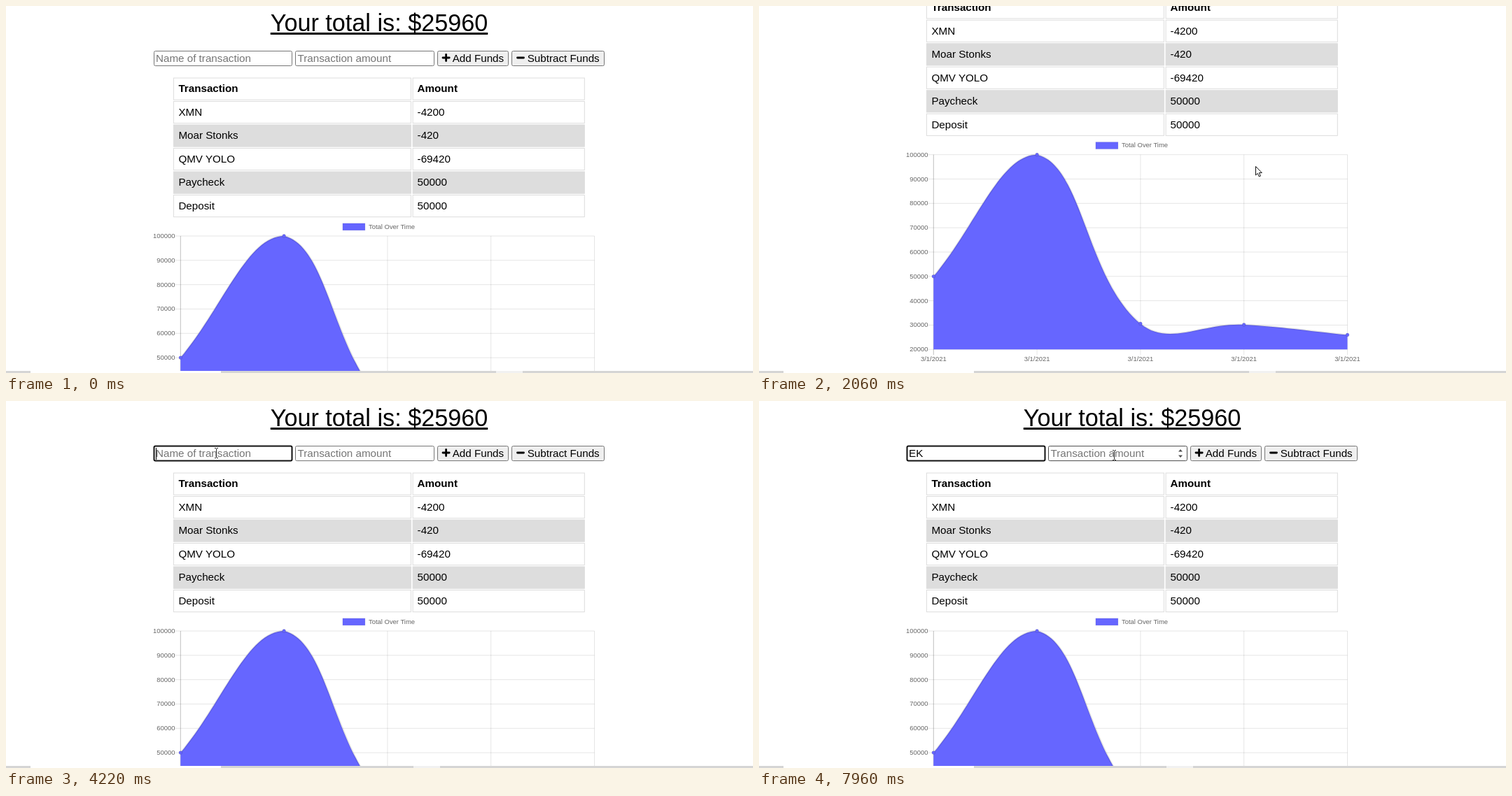
Recreate the animation shown at these times as an HTML page. Size 1067x525 px, loop 8000 ms.

```html
<!DOCTYPE html>
<html lang="en">
<head>
<meta charset="utf-8">
<title>Budget tracker</title>
<style>
html, body { margin: 0; width: 100%; height: 100%; overflow: hidden; background: #fff; }
#stage { position: relative; width: 1067px; height: 525px; overflow: hidden; font-family: "Liberation Sans", Arial, sans-serif; }
#view { position: absolute; inset: 0 0 3px; overflow: hidden; }
#page { position: absolute; left: 0; top: 0; width: 1067px; height: 650px; }
h1 { position: absolute; left: 0; top: 5px; width: 1066px; margin: 0; text-align: center; font: 34.2px/38px "Liberation Sans", Arial, sans-serif; text-decoration: underline; color: #000; }
svg { position: absolute; left: 0; top: 0; }
#page text { font-size: 15.2px; white-space: pre; }
#page .small { font-size: 9.45px; fill: #666; }
.hint { fill: #757575; }
.field { fill: #fff; stroke: #767676; }
.field.hover { stroke: #4f4f4f; }
.field.focus { stroke: #101010; stroke-width: 2; }
.button { fill: #efefef; stroke: #767676; }
#bar { position: absolute; left: 0; top: 522px; width: 1067px; height: 3px; background: #d5d5d5; }
#bar i { position: absolute; top: 0; height: 3px; }
</style>
</head>
<body>
<div id="stage">
  <div id="view">
    <div id="page">
      <h1>Your total is: $25960</h1>
      <svg id="art" width="1067" height="650"></svg>
    </div>
  </div>
  <div id="bar">
    <i style="left:35px;width:272px;background:#fff"></i>
    <i id="active" style="width:38px;background:#f1f1f1"></i>
  </div>
  <svg width="1067" height="522">
    <path id="arrow" d="M.5 .5V13L3.3 10.4 5.3 15 7.4 14.1 5.4 9.6H9.3Z" fill="#fff" stroke="#111" stroke-width="1"/>
    <path id="beam" d="M-2.5 -7.5H-.5M.5 -7.5H2.5M0 -7V6M-2.5 6.5H-.5M.5 6.5H2.5" fill="none" stroke="#333"/>
  </svg>
</div>
<script>
const LOOP = 8000, MAX_SCROLL = 116.3;
const $ = id => document.getElementById(id);

function add(tag, attrs, text) {
  const el = document.createElementNS('http://www.w3.org/2000/svg', tag);
  for (const k in attrs) el.setAttribute(k, attrs[k]);
  if (text) el.textContent = text;
  return $('art').appendChild(el);
}
const rect = (x, y, width, height, attrs) => add('rect', { x, y, width, height, ...attrs });
const label = (x, y, text, attrs) => add('text', { x, y, ...attrs }, text);

// form
const box = (x, w, cls) => rect(x, 64.5, w, 21, { rx: 2, class: cls });
const nameBox = box(211.5, 197, 'field');
const amountBox = box(413.5, 198, 'field');
const nameText = label(214, 80, 'Name of transaction');
label(416.5, 80, 'Transaction amount', { class: 'hint' });
const spinner = add('path', { d: 'M599 72.5L602 69 605 72.5ZM599 77.5L602 81 605 77.5Z', fill: '#505050' });
const caret = rect(214, 67, 1, 17, { fill: '#000' });
box(616.5, 101, 'button');
box(722.5, 132, 'button');
label(637.7, 80, 'Add Funds');
label(744.7, 80, 'Subtract Funds');
add('path', { d: 'M624 74H633.2M628.6 69.4V78.6M730.5 74H739.5', stroke: '#000', 'stroke-width': 2.8, 'stroke-linecap': 'round' });

// table
const rows = [['Transaction', 'Amount'], ['XMN', '-4200'], ['Moar Stonks', '-420'],
  ['QMV YOLO', '-69420'], ['Paycheck', '50000'], ['Deposit', '50000']];
rows.forEach((row, i) => {
  const y = 103 + 33.5 * i;
  const fill = i && i % 2 === 0 ? '#ddd' : '#fff';
  [[239.4, 339, 246.4], [581.1, 245.2, 587.6]].forEach(([x, w, tx], c) => {
    rect(x, y, w, 31.2, { fill, stroke: '#ddd' });
    label(tx, y + 20.4, row[c], { 'font-weight': i ? 400 : 700 });
  });
});

// chart
const left = 249.3, top0 = 329, stepX = 147.8, stepY = 34.82, bottom = top0 + 8 * stepY;
rect(480.9, 310.9, 32, 10, { fill: '#66f', stroke: '#0001' });
label(518, 318.8, 'Total Over Time', { class: 'small' });
for (let i = 0; i <= 8; i++) {
  const y = top0 + i * stepY;
  add('path', { d: `M${left - 7.9} ${y}H${left + 4 * stepX}`, stroke: 'rgba(0,0,0,.1)' });
  label(241.4, y + 3, 100000 - 10000 * i, { class: 'small', 'text-anchor': 'end' });
}
for (let i = 0; i <= 4; i++) {
  const x = left + i * stepX;
  add('path', { d: `M${x} ${top0}V${bottom + 7.9}`, stroke: `rgba(0,0,0,${i ? .1 : .25})` });
  label(x, bottom + 16.4, '3/1/2021', { class: 'small', 'text-anchor': 'middle' });
}

const pts = [50000, 100000, 30580, 30160, 25960]
  .map((v, i) => [left + i * stepX, top0 + (100000 - v) / 10000 * stepY]);
const dist = (a, b) => Math.hypot(a[0] - b[0], a[1] - b[1]);
const handles = pts.map((p, i) => {
  const a = pts[i - 1] || p, b = pts[i + 1] || p;
  const share = dist(a, p) / (dist(a, p) + dist(p, b));
  const at = k => [p[0] + k * (b[0] - a[0]),
    Math.min(bottom, Math.max(top0, p[1] + k * (b[1] - a[1])))];
  return [at(-.4 * share), at(.4 * (1 - share))];
});
let curve = 'M' + pts[0];
for (let i = 1; i < pts.length; i++) curve += `C${handles[i - 1][1]} ${handles[i][0]} ${pts[i]}`;
add('path', { d: `${curve}V${bottom}H${left}Z`, fill: '#66f' });
add('path', { d: curve, fill: 'none', stroke: 'rgba(0,0,0,.1)', 'stroke-width': 2.4 });
pts.forEach(([cx, cy]) => add('circle', { cx, cy, r: 2.4, fill: '#66f', stroke: 'rgba(0,0,0,.15)', 'stroke-width': .8 }));

// motion: [start, end, steps, ease power, waypoints]
const pointer = [
  [70, 350, 5, 1, [[1196, 588], [370, 187]]],
  [520, 1290, 11, 1, [[370, 187], [230, 200], [60, 300], [0, 335], [110, 320], [260, 290]]],
  [1370, 1660, 5, 1.5, [[260, 290], [699, 225]]],
  [1740, 1740, 1, 1, [[699, 225], [709, 229]]],
  [3220, 3760, 8, 1.5, [[709, 229], [300, 75]]],
  [4530, 4830, 5, 1.4, [[300, 75], [747, 188]]],
  [7270, 7960, 10, 1.4, [[747, 188], [507, 78]]]
];
const scroll = [
  [1740, 2060, 5, 1.45, [[0], [MAX_SCROLL]]],
  [2610, 2990, 6, 1.45, [[MAX_SCROLL], [0]]]
];

function sample(track, t) {
  const seg = track.filter(s => t >= s[0]).pop();
  if (!seg) return track[0][4][0];
  const [from, to, n, power, way] = seg;
  const k = n > 1 ? Math.min(n - 1, Math.floor((t - from + 6) * (n - 1) / (to - from))) : 0;
  const u = (1 - (1 - (k + 1) / n) ** power) * (way.length - 1);
  const i = Math.min(way.length - 2, Math.floor(u));
  return way[i].map((v, d) => v + (way[i + 1][d] - v) * (u - i));
}

const show = (el, on) => { el.style.visibility = on ? 'visible' : 'hidden'; };
const within = (t, spans) => spans.some(([a, b]) => t >= a && t < b);

function draw(t) {
  const [x, y] = sample(pointer, t), [offset] = sample(scroll, t);
  $('page').style.transform = offset ? `translateY(${-offset}px)` : 'none';

  const inRow = !offset && y >= 64 && y <= 86;
  const overName = inRow && x >= 211 && x <= 409;
  const overAmount = inRow && x >= 413 && x <= 612;
  const text = overName || overAmount;
  show($('arrow'), t >= 70 && !text);
  show($('beam'), text);
  $('arrow').setAttribute('transform', `translate(${Math.round(x)} ${Math.round(y)})`);
  $('beam').setAttribute('transform', `translate(${Math.round(x) + .5} ${Math.round(y)})`);

  const focused = t >= 4220;
  nameBox.setAttribute('class', 'field' + (focused ? ' focus' : overName ? ' hover' : ''));
  nameBox.setAttribute('height', 21);
  amountBox.setAttribute('class', 'field' + (overAmount ? ' hover' : ''));
  show(spinner, overAmount);
  $('active').style.left = focused ? '582px' : '700px';

  const typed = 'EK'.slice(0, (t >= 5770) + (t >= 6160));
  nameText.textContent = typed || 'Name of transaction';
  nameText.setAttribute('class', typed ? '' : 'hint');
  caret.setAttribute('x', 214 + Math.round(10.3 * typed.length));
  show(caret, within(t, [[4220, 4750], [5310, 6710], [7170, 7660]]));
}

const start = performance.now();
function tick() {
  draw((performance.now() - start) % LOOP);
  requestAnimationFrame(tick);
}
tick();
</script>
</body>
</html>
```
